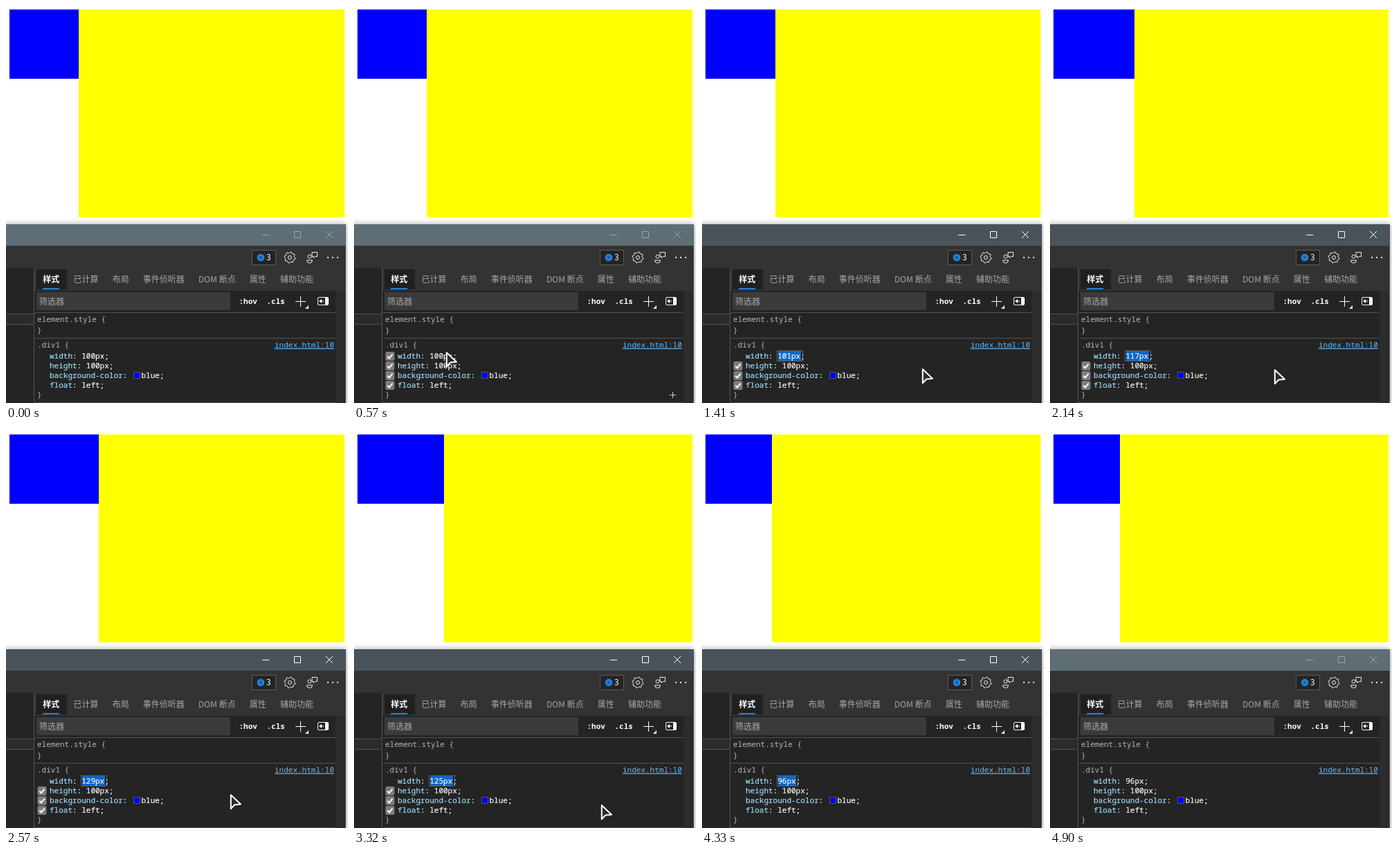
Write an HTML page that moves like this. It is 494 by 573 pixels and loops after 5.04 s.

```html
<!DOCTYPE html>
<html lang="zh">
<head>
<meta charset="utf-8">
<title>Float width</title>
<style>
  html, body { margin: 0; width: 100%; height: 100%; overflow: hidden; background: #fff; }
  svg { display: block; width: 494px; height: 573px; }
  text { font: 12px "Noto Sans CJK SC", "Noto Sans CJK", "Open Sans", sans-serif; fill: #a8a8a8; }
  .on { fill: #fff; font-weight: 700; }
  .num { fill: #fff; }
  .code text { font: 11px "Noto Sans Mono", "DejaVu Sans Mono", monospace; fill: #fff; stroke: #fff; stroke-width: .15; }
  .code .sel { fill: #b9b9b9; stroke: none; }
  .code .bold { font-weight: 700; stroke: none; }
  .code .link { fill: #62b8fa; stroke: none; text-decoration: underline; }
  .code .prop { fill: #9fe0ff; stroke: #9fe0ff; }
  .line { fill: none; stroke: #f0f0f0; }
  .win { filter: drop-shadow(0 0 4px rgba(0, 0, 0, .38)); }
  .hide { display: none; }
</style>
</head>
<body>
<svg viewBox="0 0 494 573">
  <defs>
    <g id="check">
      <rect width="13" height="13" rx="2" fill="#7c7c7c"/>
      <path d="M2.8 6.7 5.4 9.4 10.2 3.6" fill="none" stroke="#fff" stroke-width="2"/>
    </g>
  </defs>

  <rect id="yellow" y="5" height="300" fill="#ff0"/>
  <rect id="blue" x="5" y="5" height="100" fill="#00f"/>

  <rect class="win" x="-20" y="315" width="511" height="280" fill="#242424"/>
  <rect id="bar" y="315" width="491" height="31"/>
  <path id="buttons" d="M370 330.5h10M416.5 325.5h9v9h-9zM462 325l10 10m0-10l-10 10" fill="none"/>

  <!-- toolbar and tabs -->
  <path d="M0 346h491v32H0zM41 378h450v33H41z" fill="#333"/>
  <rect x="355.500" y="352.500" width="34" height="21" fill="#242424" stroke="#5c5c5c"/>
  <circle cx="368" cy="363" r="5.300" fill="#2583e0"/>
  <circle cx="368" cy="363" r="2.400" fill="#1a5fa8"/>
  <text class="num" x="376" y="367">3</text>
  <g class="line">
    <path id="gear"/>
    <circle cx="410" cy="363" r="2.500"/>
    <circle cx="438.500" cy="361.500" r="2.500"/>
    <path d="M434.500 367h8q0 4-4 4t-4-4z"/>
    <path d="M442 355.500h7.500v6h-3l-2.500 2v-2h-2z" stroke-linejoin="round"/>
  </g>
  <path d="M464 363h17" stroke="#f0f0f0" stroke-width="2" stroke-dasharray="2 5"/>
  <rect x="44" y="380" width="44" height="29" fill="#202020"/>
  <rect x="53" y="407" width="24" height="2" fill="#1f80e0"/>
  <text id="tabs" x="33" y="399"></text>

  <!-- filter row and rules -->
  <rect x="44" y="413" width="280" height="26" fill="#3b3b3b"/>
  <text x="48" y="431">筛选器</text>
  <path d="M418 426.500h15M425.500 419v15" stroke="#fff"/>
  <path d="M437 432v5h-5z" fill="#fff"/>
  <rect class="line" x="450.500" y="420.500" width="15" height="11" rx="1.500"/>
  <path d="M461 421h5v10h-5zM452 426l4-3v6z" fill="#fff"/>
  <path d="M455 426h4" stroke="#fff"/>
  <rect x="476" y="411" width="14" height="162" fill="#2c2c2c"/>
  <rect y="444" width="40" height="16" fill="#2b2b2b"/>
  <path d="M40.500 378v195M41 442.500h435M41 479.500h435M41 572.500h435M0 444.500h40M0 459.500h40M490.500 346v227" stroke="#525252"/>

  <g class="code">
    <text class="bold" x="336.500" y="430">:hov</text>
    <text class="bold" x="376.500" y="430">.cls</text>
    <text class="sel" x="45" y="456">element.style {</text>
    <text class="sel" x="45" y="472">}</text>
    <text class="sel" x="45" y="493">.div1 {</text>
    <text class="link" x="388" y="493">index.html:10</text>
    <g id="field">
      <rect id="box" x="108.500" y="497.500" height="15" fill="#202020" stroke="#5e5e5e"/>
      <rect id="mark" x="110" y="498" height="14" fill="#0a66cc"/>
    </g>
    <text x="63" y="509"><tspan class="prop">width</tspan>: <tspan id="value"></tspan>;</text>
    <text x="63" y="523"><tspan class="prop">height</tspan>: 100px;</text>
    <text x="63" y="537"><tspan class="prop">background-color</tspan>:</text>
    <rect x="184.500" y="528.500" width="9" height="9" fill="#00f" stroke="#555"/>
    <text x="195.500" y="537">blue;</text>
    <text x="63" y="551"><tspan class="prop">float</tspan>: left;</text>
    <text class="sel" x="45" y="565">}</text>
  </g>

  <g id="first">
    <use href="#check" x="45.500" y="499"/>
    <path d="M456 561.500h9M460.500 557v9" stroke="#c8c8c8"/>
  </g>
  <g id="rest">
    <use href="#check" x="45.500" y="513"/>
    <use href="#check" x="45.500" y="527"/>
    <use href="#check" x="45.500" y="541"/>
  </g>
  <path id="cursor" d="M1.800 2.200V22.300L7.200 16.500 16 15.700Z" fill="#2b2d30" stroke="#fff" stroke-width="2" stroke-linejoin="round"/>
</svg>
<script>
  const $ = id => document.getElementById(id);
  const set = (id, name, v) => $(id).setAttribute(name, v);
  const show = (id, on) => $(id).classList.toggle('hide', !on);

  // The screen refreshes in 35 equal ticks; all key points are given in ticks.
  const TICK = 144, COUNT = 35, LEAD = 30;
  const ENTER = 1, EDIT = 5, LEAVE = 30, BLUR = 34;

  // One step up, a held key up, one step down, a held key down.
  const widths = [[7, 100], [8, 101], [11, 101], [18, 129], [19, 129],
    [20, 128], [22, 128], [23, 125], [29, 99], [30, 96]];
  const path = [[1, 253, 552], [3, 157, 516], [4, 132, 498], [5, 132, 498], [6, 246, 512],
    [8, 314, 520], [10, 317, 522], [12, 323, 523], [19, 323, 523], [22, 341, 531],
    [23, 356, 538], [27, 369, 547], [29, 388, 555]];

  // Linear interpolation between key points, held at both ends.
  function at(keys, k) {
    const i = keys.findIndex(key => key[0] > k);
    if (i < 1) return keys.at(i).slice(1);
    const [a, b] = [keys[i - 1], keys[i]];
    const p = (k - a[0]) / (b[0] - a[0]);
    return a.slice(1).map((v, j) => Math.round(v + (b[j + 1] - v) * p));
  }

  const tabs = ['样式', '已计算', '布局', '事件侦听器', 'DOM 断点', '属性', '辅助功能'];
  $('tabs').innerHTML = tabs.map((name, i) =>
    `<tspan dx="20.2"${i ? '' : ' class="on"'}>${name}</tspan>`).join('');

  const teeth = [];
  for (let i = 0; i < 32; i++) {
    const a = (i + 0.5) * Math.PI / 16, r = i % 4 < 2 ? 8 : 6.5;
    teeth.push(`${410 + r * Math.cos(a)} ${363 + r * Math.sin(a)}`);
  }
  set('gear', 'd', 'M' + teeth.join('L') + 'Z');

  function draw(t) {
    const k = Math.min(COUNT - 1, Math.floor((t + LEAD) / TICK));
    const hover = k >= ENTER && k < LEAVE, edit = k >= EDIT && k < BLUR;
    const [w] = at(widths, k), [x, y] = at(path, k);
    const text = w + 'px', len = Math.round(text.length * 6.6);

    set('blue', 'width', w);
    set('yellow', 'x', 5 + w);
    set('yellow', 'width', 484 - w);
    set('bar', 'fill', edit ? '#4b535a' : '#5e6e75');
    set('buttons', 'stroke', edit ? '#fff' : '#9da7ab');
    $('value').textContent = text;
    set('box', 'width', len + 4);
    set('mark', 'width', len);
    set('cursor', 'transform', `translate(${x} ${y})`);
    show('field', edit);
    show('first', hover && !edit);
    show('rest', hover);
    show('cursor', hover);
  }

  const start = performance.now();
  function loop() {
    draw((performance.now() - start) % (TICK * COUNT));
    requestAnimationFrame(loop);
  }
  loop();
</script>
</body>
</html>
```
